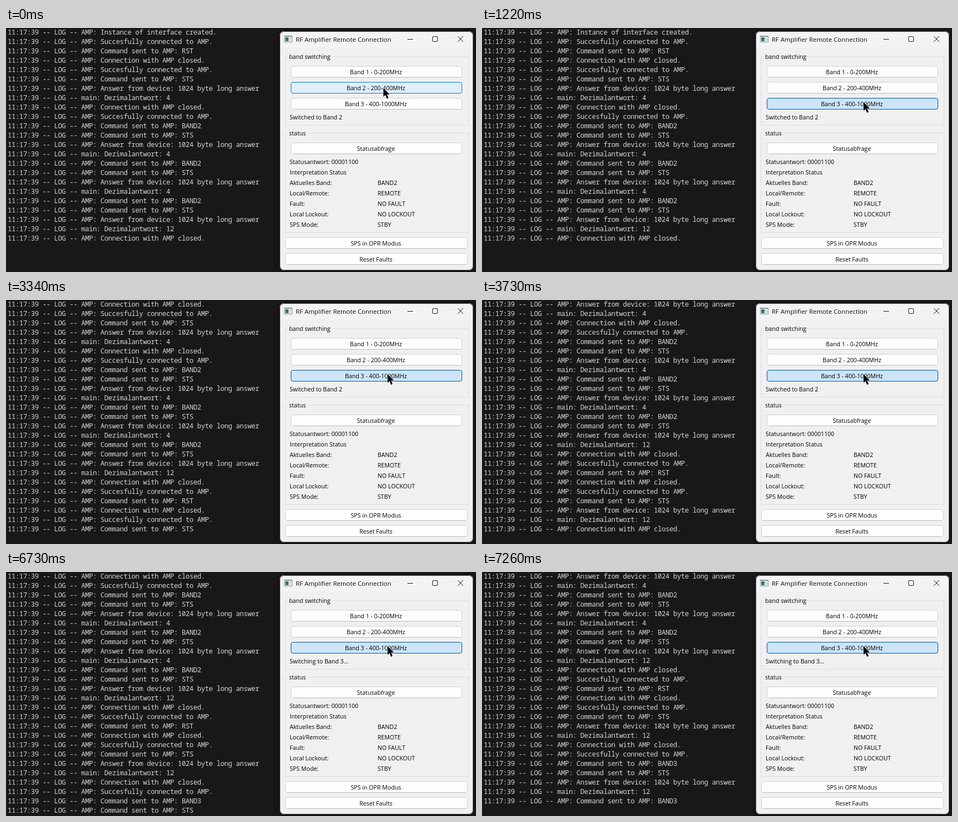
Write an HTML page with a canvas that moves like this. It is 850 px wide and 443 px high and loops after 8 s.

```html
<!DOCTYPE html>
<html lang="en">
<head>
<meta charset="utf-8">
<title>Remote Connection</title>
<style>
html, body { margin: 0; width: 100%; height: 100%; overflow: hidden; background: #181818; }
canvas { display: block; }
</style>
</head>
<body>
<canvas id="stage" width="850" height="443"></canvas>
<script>
const ctx = document.getElementById('stage').getContext('2d');
const LOOP = 8000;
const MONO = '500 12.4px "Noto Sans Mono", "DejaVu Sans Mono", monospace';
const UI = '10.65px "Open Sans", "Noto Sans", sans-serif';
const TITLE = '11.45px "Open Sans", "Noto Sans", sans-serif';

// Each letter of the script stands for one log line
const LINES = {
  i: 'AMP: Instance of interface created.',
  o: 'AMP: Succesfully connected to AMP.',
  c: 'AMP: Connection with AMP closed.',
  a: 'AMP: Answer from device: 1024 byte long answer',
  r: 'AMP: Command sent to AMP: RST',
  s: 'AMP: Command sent to AMP: STS',
  2: 'AMP: Command sent to AMP: BAND2',
  3: 'AMP: Command sent to AMP: BAND3',
  4: 'main: Dezimalantwort: 4',
  d: 'main: Dezimalantwort: 12'
};
const SCRIPT = 'iorcosa4co2sa42sa42sadcorcosadco3sad3';

// [start time, first visible line, number of lines written]
const VIEWS = [
  [0, 0, 23], [2280, 1, 26], [3340, 3, 28], [3730, 6, 31], [4790, 8, 33],
  [6730, 8, 34], [6800, 9, 34], [7190, 9, 35], [7260, 12, 37]
];

const STATUS = [
  ['Aktuelles Band:', 'BAND2'],
  ['Local/Remote:', 'REMOTE'],
  ['Fault:', 'NO FAULT'],
  ['Local Lockout:', 'NO LOCKOUT'],
  ['SPS Mode:', 'STBY']
];

// Button looks: fill, border, bottom edge
const IDLE = [[253, 253, 253], [208, 208, 208], [186, 186, 186]];
const HOVER = [[224, 238, 249], [0, 120, 212], [0, 120, 212]];
const DOWN = [[204, 228, 247], [0, 84, 153], [0, 84, 153]];

const clamp = v => Math.max(0, Math.min(1, v));
const ease = v => v * v * (3 - 2 * v);
const mix = (a, b, p) => a.map((v, i) => v + (b[i] - v) * p);
const blend = (a, b, p) => a.map((c, i) => mix(c, b[i], p));
const rgb = c => `rgb(${c.map(Math.round).join(',')})`;
// Number of steps done since a start time
const steps = (t, start, gap, max) =>
  t < start ? 0 : Math.min(max, Math.floor((t - start) / gap) + 1);

function text(s, x, y, font = UI, color = '#000', align = 'left') {
  ctx.font = font;
  ctx.fillStyle = color;
  ctx.textAlign = align;
  ctx.fillText(s, x, y);
}

function rounded(x, y, w, h, r) {
  ctx.beginPath();
  ctx.roundRect(x, y, w, h, r);
}

function button(label, x, y, w, [fill, border, bottom] = IDLE) {
  rounded(x + 0.5, y + 0.5, w - 1, 20, 3.5);
  ctx.fillStyle = rgb(fill);
  ctx.fill();
  ctx.strokeStyle = rgb(border);
  ctx.lineWidth = 1;
  ctx.stroke();
  ctx.fillStyle = rgb(bottom);
  ctx.fillRect(x + 4, y + 20, w - 8, 1);
  text(label, x + w / 2 - 1, y + 15, UI, '#000', 'center');
}

function group(label, y, h, gapEnd) {
  ctx.strokeStyle = '#dcdcdc';
  ctx.lineWidth = 1;
  ctx.strokeRect(504.5, y + 0.5, 331, h);
  ctx.fillStyle = '#f0f0f0';
  ctx.fillRect(510, y - 1, gapEnd - 510, 3);
  text(label, 512, y + 5);
}

function drawLog(t) {
  const [, top, end] = VIEWS.filter(v => v[0] <= t).pop();
  ctx.letterSpacing = '-0.44px';
  for (let i = top; i < end; i++) {
    text('11:17:39 -- LOG -- ' + LINES[SCRIPT[i]], 3, 12 + 17 * (i - top), MONO, '#d4d4d4');
  }
  ctx.letterSpacing = '0px';
}

function drawIcon() {
  ctx.fillStyle = '#8a9096';
  ctx.fillRect(503, 14, 15, 12);
  ctx.fillStyle = '#f8f8f8';
  ctx.fillRect(504, 16, 13, 9);
  const g = ctx.createLinearGradient(0, 17, 0, 24);
  g.addColorStop(0, '#3b6c8c');
  g.addColorStop(1, '#3d7a68');
  ctx.fillStyle = g;
  ctx.fillRect(505, 17, 6, 7);
  ctx.fillStyle = '#d4d8dc';
  ctx.fillRect(512, 17, 4, 7);
}

function drawFrame() {
  ctx.save();
  ctx.shadowColor = 'rgba(0,0,0,.5)';
  ctx.shadowBlur = 14;
  ctx.shadowOffsetY = 3;
  ctx.fillStyle = '#f0f0f0';
  rounded(495, 6, 350, 434, 8);
  ctx.fill();
  ctx.restore();
  ctx.fillStyle = '#f3f3f3';
  rounded(495, 6, 350, 30, [8, 8, 0, 0]);
  ctx.fill();
  ctx.strokeStyle = '#5c5c5c';
  ctx.lineWidth = 1;
  rounded(495.5, 6.5, 349, 433, 7.5);
  ctx.stroke();

  drawIcon();
  text('RF Amplifier Remote Connection', 524, 25, TITLE, '#111');
  ctx.strokeStyle = '#1a1a1a';
  rounded(771.5, 15.5, 9, 9, 1.5);
  ctx.moveTo(726, 20.5);
  ctx.lineTo(736, 20.5);
  ctx.moveTo(817, 15);
  ctx.lineTo(827, 25);
  ctx.moveTo(827, 15);
  ctx.lineTo(817, 25);
  ctx.stroke();
}

function drawPanel(t) {
  const n = steps(t, 270, 70, 8);
  const press = steps(t, 1030, 63, 4) / 4;
  const second = blend(HOVER, IDLE, clamp((n - 2) / 4));
  const third = blend(blend(IDLE, HOVER, clamp((n - 4) / 4)), DOWN, press);

  group('band switching', 51, 125, 587);
  button('Band 1 - 0-200MHz', 515, 69, 310);
  button('Band 2 - 200-400MHz', 515, 98, 310, second);
  button('Band 3 - 400-1000MHz', 515, 127, 310, third);
  text(t < 4720 ? 'Switched to Band 2' : 'Switching to Band 3...', 513, 166);

  group('status', 190, 181, 546);
  button('Statusabfrage', 515, 208, 310);
  text('Statusantwort: 00001100', 513, 247);
  text('Interpretation Status', 513, 266);
  STATUS.forEach(([name, value], i) => {
    text(name, 513, 285 + 19 * i);
    text(value, 672, 285 + 19 * i);
  });
  button('SPS in OPR Modus', 505, 380, 330);
  button('Reset Faults', 505, 409, 330);
}

function drawCursor(t) {
  const p = ease(clamp(steps(t, 270, 70, 8) / 5));
  ctx.save();
  ctx.translate(682.5 + 7.5 * p, 109 + 25.5 * p);
  ctx.beginPath();
  [[0, 0], [0, 16], [3.6, 12.8], [6.4, 19.4], [9.2, 18.1], [6.5, 11.8], [11.4, 11.4]]
    .forEach(([x, y]) => ctx.lineTo(x, y));
  ctx.closePath();
  ctx.lineJoin = 'round';
  ctx.lineWidth = 1.2;
  ctx.strokeStyle = '#fff';
  ctx.stroke();
  ctx.fillStyle = '#000';
  ctx.fill();
  ctx.restore();
}

function draw(t) {
  ctx.fillStyle = '#181818';
  ctx.fillRect(0, 0, 850, 443);
  drawLog(t);
  drawFrame();
  drawPanel(t);
  drawCursor(t);
}

const begin = performance.now();
function tick() {
  draw((performance.now() - begin) % LOOP);
  requestAnimationFrame(tick);
}
tick();
</script>
</body>
</html>
```
